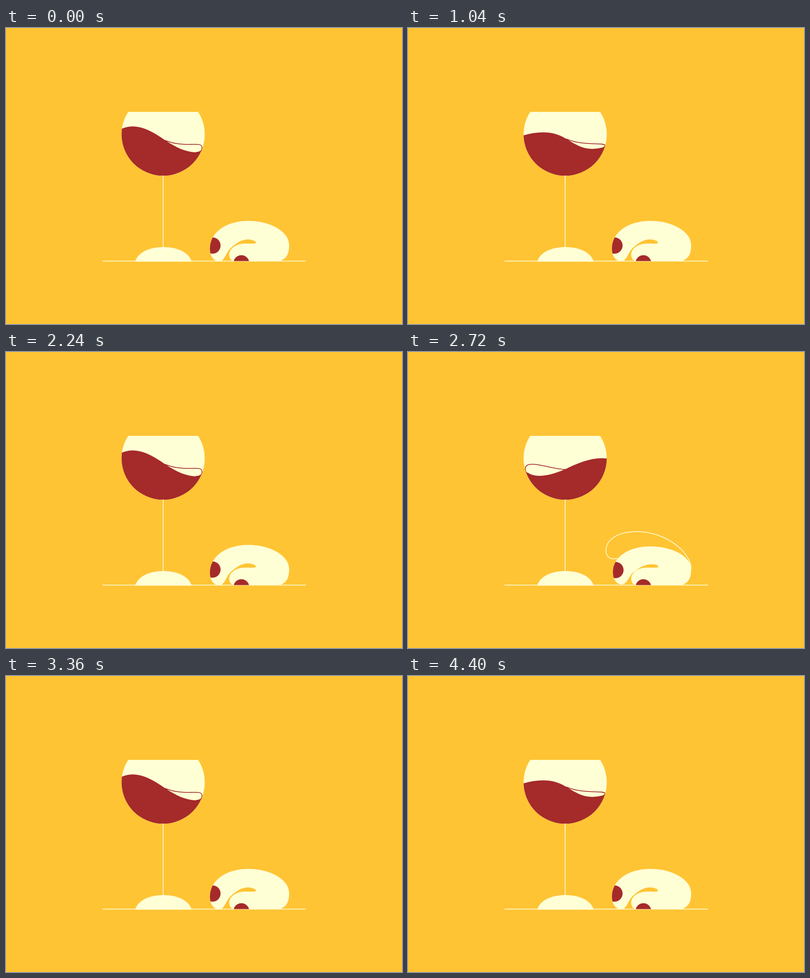
Recreate the animation shown at these times as an HTML page with a canvas. Size 800 px wide and 600 px high, loop 4480 ms.

```html
<!DOCTYPE html>
<html lang="en">
<head>
<meta charset="utf-8">
<title>Wine glass and castanets</title>
<style>
html, body { margin: 0; width: 100%; height: 100%; overflow: hidden; background: #ffc434; }
canvas { display: block; }
</style>
</head>
<body>
<canvas id="stage" width="800" height="600"></canvas>
<script>
const ctx = document.getElementById('stage').getContext('2d');
const YELLOW = '#ffc434', CREAM = '#ffffd6', WINE = '#a52a2a';
const LOOP = 4480, SWING = 14;
const GLASS = { x: 317.5, y: 215.5, r: 84, rim: 170 };

const mix = (a, b, k) => a + (b - a) * k;
const blend = (p, q, k) => p.map((v, i) => mix(v, q[i], k));

function fill(path, color) { ctx.fillStyle = color; ctx.fill(path); }
function stroke(path, color) { ctx.strokeStyle = color; ctx.lineWidth = 1.5; ctx.stroke(path); }
function disc(x, y, r) { const p = new Path2D(); p.arc(x, y, r, 0, 7); return p; }
function clipped(path, draw) { ctx.save(); ctx.clip(path); draw(); ctx.restore(); }

// Wine pose: centre, then for the left and right side
// surface end, its handle, surface handle at centre, rim handle at centre, rim handle, rim tip.
const leftHigh = [322,228, 232,205, 264,190, 295,209, 295,228, 260,215, 232,205,
  384,252, 365,252, 345,243, 365,245, 396,227, 396,243];
const level = [317,246, 237,233, 262,246, 290,247, 285,240, 237,216, 235,228,
  396,239, 372,250, 345,249, 345,241, 396,217, 398,235];
const rightRising = [317,238, 244,246, 262,256, 288,250, 290,238, 237,215, 237,237,
  403,216, 375,212, 345,224, 345,240, 385,230, 403,216];
const rightHigh = [320,214, 253,254, 277,256, 298,232, 295,222, 242,216, 240,243,
  403,201, 375,192, 348,199, 350,225, 385,215, 403,201];
const leftRising = [320,225, 232,218, 266,208, 296,209, 295,235, 260,225, 232,218,
  394,242, 360,250, 347,241, 355,240, 396,231, 398,238];

function mirror(p) {
  const f = p.map((v, i) => i % 2 ? v : 2 * GLASS.x - v);
  return [...f.slice(0, 2), ...f.slice(14), ...f.slice(2, 14)];
}

const swing = [
  [0, leftHigh], [1, blend(leftRising, leftHigh, 1.25)], [4, level], [6, rightRising],
  [7, rightHigh], [8, blend(rightRising, rightHigh, 1.25)], [11, mirror(level)],
  [13, leftRising], [14, leftHigh]
];

function winePose(step) {
  const i = swing.findIndex(key => key[0] > step);
  const [a, p] = swing[i - 1], [b, q] = swing[i];
  return blend(p, q, (step - a) / (b - a));
}

function drawWine(step) {
  const p = winePose(step), [cx, cy] = p, l = p.slice(2, 14), r = p.slice(14);
  const rim = new Path2D();
  rim.moveTo(l[0], l[1]);
  rim.quadraticCurveTo(l[10], l[1], l[10], l[11]);
  rim.bezierCurveTo(l[8], l[9], l[6], l[7], cx, cy);
  rim.bezierCurveTo(r[6], r[7], r[8], r[9], r[10], r[11]);
  rim.quadraticCurveTo(r[10], r[1], r[0], r[1]);

  const body = new Path2D();
  body.moveTo(200, 310);
  body.lineTo(200, l[11]);
  body.lineTo(l[10], l[11]);
  body.quadraticCurveTo(l[10], l[1], l[0], l[1]);
  body.bezierCurveTo(l[2], l[3], l[4], l[5], cx, cy);
  body.bezierCurveTo(r[4], r[5], r[2], r[3], r[0], r[1]);
  body.quadraticCurveTo(r[10], r[1], r[10], r[11]);
  body.lineTo(430, r[11]);
  body.lineTo(430, 310);

  stroke(rim, WINE);
  fill(body, WINE);
}

function drawGlass(step) {
  const upper = new Path2D();
  upper.rect(200, GLASS.rim, 240, 140);
  const bowl = disc(GLASS.x, GLASS.y, GLASS.r);
  clipped(upper, () => {
    fill(bowl, CREAM);
    clipped(bowl, () => drawWine(step));
  });
  stroke(new Path2D('M317.5 299V446M195 472.5H606'), CREAM);
  fill(new Path2D('M261 473.5C266 455 290 444 318 444S370 455 375 473.5Z'), CREAM);
}

// Jaw pose: two back handles (the second shares the top's height), top, nose, chin,
// palate, throat, mouth corner, spot.
const jaw = {
  shut: [572,412, 533, 490,391, 412,447, 431,473, 455,445, 483,429, 505,435, 417,441],
  start: [572,414, 533, 490,394, 414,446, 432,471, 456,446, 484,431, 506,435, 419,442],
  low: [572,405, 520, 462,364, 400,402, 414,419, 458,417, 490,422, 506,434, 417,398],
  mid: [572,392, 497, 445,359, 406,388, 440,409, 470,408, 496,416, 507,432, 438.5,362.5],
  high: [565,395, 480, 432,343, 413,362, 446,390, 480,396, 503,410, 508,431, 455,346],
  wide: [565,400, 505, 460,326, 444,341, 476,368, 496,388, 507,405, 508,431, 482,332],
  open: [566,400, 518, 473,317, 458,331, 490,358, 504,383, 509,404, 509,431, 497,326]
};

// Each step: the solid pose, then the outlines that run ahead of it.
const { shut, start, low, mid, high, wide, open } = jaw;
const snap = [
  [start, low], [low, mid, high], [mid, high, wide], [high, wide, open], [wide, open],
  [blend(wide, open, .6)], [blend(wide, open, .85)], [open], [open], [low]
];

function jawPath(p, whole) {
  const [ax, ay, bx, tx, ty, nx, ny, cx, cy, px, py, hx, hy, ex, ey] = p;
  const path = new Path2D();
  path.moveTo(572, 440);
  path.bezierCurveTo(ax, ay, bx, ty, tx, ty);
  path.bezierCurveTo(mix(tx, nx, .6), ty, nx, mix(ny, ty, .57), nx, ny);
  path.bezierCurveTo(nx, mix(ny, cy, .6), mix(cx, nx, .6), cy, cx, cy);
  const ux = (hx - cx) * .2, uy = (hy - cy) * .2;
  path.bezierCurveTo(mix(cx, px, .45), cy, px - ux, py - uy, px, py);
  if (!whole) return path;
  const vx = (ex - px) * .2, vy = (ey - py) * .2;
  path.bezierCurveTo(px + ux, py + uy, hx - vx, hy - vy, hx, hy);
  path.bezierCurveTo(hx + vx, hy + vy, ex, ey - 4, ex, ey);
  path.bezierCurveTo(ex, 438, 495, 437, 483, 437);
  path.bezierCurveTo(463, 437, 451, 448, 451, 460);
  path.bezierCurveTo(451, 467, 455, 472, 462, 472.5);
  path.lineTo(552, 472.5);
  path.bezierCurveTo(566, 469, 572, 459, 572, 440);
  return path;
}

function drawCastanets(t) {
  const begin = t < 2240 ? 280 : 2720;
  const [pose, ...ahead] = snap[Math.floor((t - begin) / 40)] || [shut];
  for (const p of ahead.reverse()) {
    const outline = jawPath(p, false);
    fill(outline, YELLOW);
    stroke(outline, CREAM);
  }
  const body = jawPath(pose, true);
  fill(body, CREAM);
  clipped(body, () => {
    fill(disc(pose[15], pose[16], 16.5), WINE);
    fill(disc(475.5, 476.5, 16), WINE);
  });
}

function frame(now) {
  const t = now % LOOP;
  ctx.fillStyle = YELLOW;
  ctx.fillRect(0, 0, 800, 600);
  drawGlass(Math.floor(t / 80) % SWING);
  drawCastanets(t);
  requestAnimationFrame(frame);
}

const t0 = performance.now();
(function run() {
  const tick = () => frame(performance.now() - t0);
  const draw = frame;
  frame = now => draw(now > 0 ? performance.now() - t0 : 0);
  tick();
})();
</script>
</body>
</html>
```
